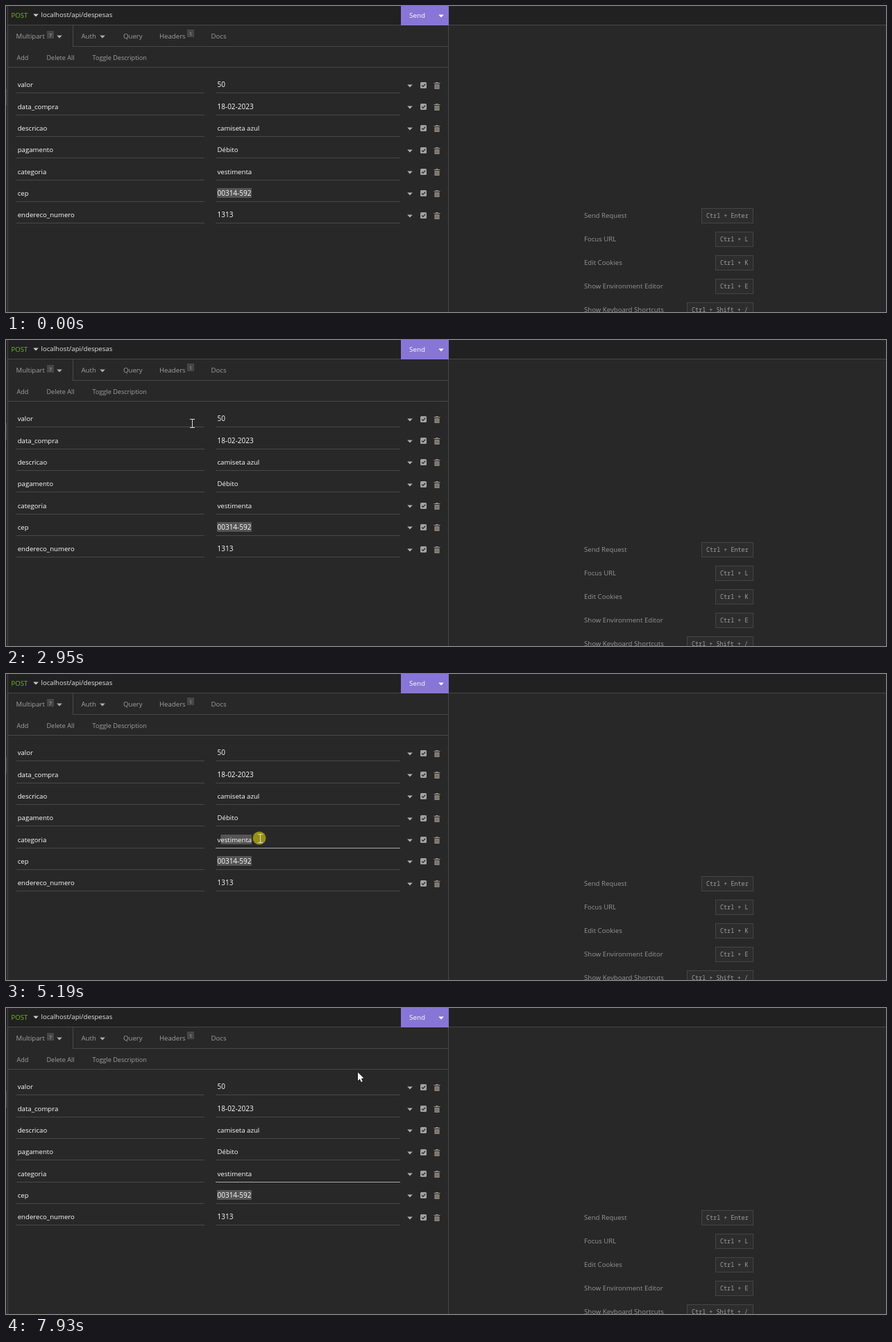
Write an HTML page with a canvas that moves like this. It is 1268 px wide and 442 px high and loops after 8000 ms.

```html
<!DOCTYPE html>
<html lang="pt">
<head>
<meta charset="utf-8">
<title>Request form</title>
<style>
html, body { margin: 0; width: 100%; height: 100%; overflow: hidden; background: #282828; }
canvas { display: block; }
</style>
</head>
<body>
<canvas id="stage" width="1268" height="442"></canvas>
<script>
const ctx = document.getElementById('stage').getContext('2d');
const LOOP = 8000, PRESS = 4820, RELEASE = 7060;
const SANS = '"Open Sans", "Noto Sans", sans-serif';
const MONO = '"Noto Sans Mono", "Liberation Mono", monospace';
const LINE = '#484848', MUTED = '#a0a0a0', ICON = '#a2a2a2', SELECTION = '#555';
const DRAG_ROW = 4, CODE_ROW = 5, VALUE_X = 304.5;

const rows = [
  ['valor', '50'],
  ['data_compra', '18-02-2023'],
  ['descricao', 'camiseta azul'],
  ['pagamento', 'Débito'],
  ['categoria', 'vestimenta'],
  ['cep', '00314-592'],
  ['endereco_numero', '1313']
];

const shortcuts = [
  ['Send Request', 'Ctrl + Enter'],
  ['Focus URL', 'Ctrl + L'],
  ['Edit Cookies', 'Ctrl + K'],
  ['Show Environment Editor', 'Ctrl + E'],
  ['Show Keyboard Shortcuts', 'Ctrl + Shift + /']
];

// The pointer rests between moves; "via" bends a move into a quadratic curve.
const origin = [380, 446];
const moves = [
  { from: 500, until: 970, to: [486, 446], via: [440, 364] },
  { from: 1330, until: 1370, to: [542, 440] },
  { from: 1370, until: 2160, to: [301, 182], via: [148, 146] },
  { from: 2200, until: 2410, to: [311, 190] },
  { from: 2590, until: 2950, to: [268, 120], via: [443, 74] },
  { from: 2950, until: 3320, to: [250, 146], via: [215, 130] },
  { from: 3420, until: 3990, to: [310, 215] },
  { from: 4280, until: 4530, to: [312, 234] },
  { from: 4820, until: 5190, to: [366, 237] },
  { from: 5650, until: 5860, to: [291, 240] },
  { from: 5860, until: 6440, to: [343, 241], via: [261, 241] },
  { from: 6520, until: 6770, to: [402, 242] },
  { from: 7600, until: 7930, to: [507, 93], via: [275, 190] }
];

const mix = (a, b, k) => a + (b - a) * k;

function pointerAt(t) {
  let position = origin;
  for (const { from, until, to, via } of moves) {
    if (t < from) break;
    const k = Math.min(1, (t - from) / (until - from));
    const start = position;
    position = to.map((end, axis) => via
      ? mix(mix(start[axis], via[axis], k), mix(via[axis], end, k), k)
      : mix(start[axis], end, k));
  }
  const [x, y] = position.map(Math.round);
  return { x, y };
}

function rect(x, y, w, h, color) {
  ctx.fillStyle = color;
  ctx.fillRect(x, y, w, h);
}

function textWidth(str, size = 9.65) {
  ctx.font = `${size}px ${SANS}`;
  return ctx.measureText(str).width;
}

function text(str, x, middle, color, size = 9.65, family = SANS) {
  ctx.font = `${size}px ${family}`;
  ctx.fillStyle = color;
  ctx.fillText(str, x, Math.round(middle + 3.5));
}

function polygon(points, color, outline) {
  ctx.beginPath();
  points.forEach(([x, y]) => ctx.lineTo(x, y));
  ctx.closePath();
  if (outline) {
    ctx.strokeStyle = outline;
    ctx.lineWidth = 1.5;
    ctx.stroke();
  }
  ctx.fillStyle = color;
  ctx.fill();
}

function caret(x, y, color = '#b0b0b0') {
  polygon([[x - 3.8, y - 2], [x + 3.8, y - 2], [x, y + 2]], color);
}

function badge(label, x, y) {
  rect(x, y, 10, 11, '#464646');
  text(label, x + 3, y + 5, '#b0b0b0', 7);
}

function checkbox(x, y) {
  ctx.beginPath();
  ctx.roundRect(x, y, 9, 9, 1.5);
  ctx.fillStyle = ICON;
  ctx.fill();
  ctx.beginPath();
  ctx.moveTo(x + 2, y + 4.6);
  ctx.lineTo(x + 3.8, y + 6.4);
  ctx.lineTo(x + 7.2, y + 2.8);
  ctx.strokeStyle = '#282828';
  ctx.lineWidth = 1.3;
  ctx.stroke();
}

function trash(x, y) {
  rect(x, y + 1, 9, 1, '#a0978e');
  rect(x + 3, y, 3, 1, '#a0978e');
  rect(x + 1, y + 3, 7, 7, '#958b82');
  for (let i = 0; i < 3; i++) rect(x + 2.5 + 1.7 * i, y + 4, 0.6, 5, '#55504b');
}

function drawChrome() {
  rect(0, 0, 1268, 442, '#282828');
  rect(0, 0, 1268, 27, '#212121');
  rect(2, 27, 1266, 1, LINE);
  rect(2, 0, 1, 442, LINE);
  rect(637, 0, 1, 442, LINE);
  rect(96, 28, 1, 31, LINE);
  rect(96, 58, 541, 1, LINE);
  rect(2, 88, 635, 1, LINE);
  rect(0, 120, 1, 24, LINE);

  text('POST', 7.5, 13.4, '#75ba24');
  caret(43, 13.5, '#ccc');
  text('localhost/api/despesas', 50.5, 12.9, '#e6e6e6');
  rect(569, 0, 69, 28, '#8776d5');
  text('Send', 581, 13.4, '#fff', 9.85);
  caret(627, 14.5, '#fff');

  [['Multipart', 14.5], ['Auth', 108.5], ['Query', 169], ['Headers', 221], ['Docs', 295.5]]
    .forEach(([label, x]) => text(label, x, 43.4, MUTED));
  badge('7', 59, 36);
  badge('1', 261, 34);
  caret(77, 44.5);
  caret(139, 44.5);

  let x = 15.5;
  for (const label of ['Add', 'Delete All', 'Toggle Description']) {
    text(label, x, 74, MUTED, 9.1);
    x += textWidth(label, 9.1) + 26;
  }
}

function drawShortcuts() {
  shortcuts.forEach(([label, keys], i) => {
    const y = 302.4 + 34 * i;
    const top = Math.round(y - 10.4);
    const width = Math.round(keys.length * 5.1 + 14);
    text(label, 833, y, '#959595');
    rect(1077 - width, top, width, 22, '#454545');
    rect(1078 - width, top + 1, width - 2, 20, '#2d2d2d');
    text(keys, 1084 - width, y, '#a0a0a0', 8.45, MONO);
  });
}

// Selects from after the first letter to the letter gap nearest the pointer.
function drawDragSelection(str, pointerX) {
  const gaps = Array.from({ length: str.length + 1 }, (_, i) => VALUE_X + textWidth(str.slice(0, i)));
  const distance = x => Math.abs(x - pointerX);
  const end = gaps.reduce((a, b) => distance(b) < distance(a) ? b : a);
  rect(Math.min(gaps[1], end), 232, Math.abs(end - gaps[1]), 14, SELECTION);
}

function drawRows(t, pointer) {
  rows.forEach(([name, value], i) => {
    const y = 113.8 + 31.35 * i;
    const lineY = Math.round(y + 11.5);
    const iconY = Math.round(y + 0.9);
    const size = /^\d/.test(value) ? 10 : 9.65;
    const focused = i === DRAG_ROW && t >= PRESS;
    rect(15, lineY, 271, 1, LINE);
    rect(302, lineY, 266, 1, focused ? '#a8a8a8' : LINE);
    if (i === CODE_ROW) rect(304, 263, textWidth(value, size) + 1, 14, SELECTION);
    if (focused && t < RELEASE) drawDragSelection(value, pointer.x);
    text(name, 16.7, y, '#fff');
    text(value, VALUE_X, y, '#fff', size);
    caret(582, iconY + 0.5);
    checkbox(597, iconY - 5);
    trash(616.5, iconY - 5);
  });
}

function drawArrow(x, y) {
  const outline = [[0, 0], [0, 12], [2.8, 9.5], [4.8, 14], [6.8, 13], [4.9, 8.8], [8.6, 8.6]];
  polygon(outline.map(([dx, dy]) => [x + dx, y + dy]), '#fff', '#111');
}

function drawTextCursor(x, y) {
  rect(x, y - 6, 1, 13, '#dcdcdc');
  for (const dy of [-6, 6]) {
    rect(x - 3, y + dy, 3, 1, '#dcdcdc');
    rect(x + 1, y + dy, 3, 1, '#dcdcdc');
  }
}

function drawPointer(t, { x, y }) {
  const overField = y > 100 && y < 316 && (x > 14 && x < 286 || x > 300 && x < 568);
  if (!overField) return drawArrow(x, y);
  if (t >= PRESS && t < RELEASE) {
    ctx.beginPath();
    ctx.arc(x - 1, y, 9.5, 0, Math.PI * 2);
    ctx.fillStyle = 'rgba(240, 230, 0, .55)';
    ctx.fill();
  }
  drawTextCursor(x, y);
}

function draw() {
  const t = performance.now() % LOOP;
  const pointer = pointerAt(t);
  drawChrome();
  drawRows(t, pointer);
  drawShortcuts();
  drawPointer(t, pointer);
  requestAnimationFrame(draw);
}
draw();
</script>
</body>
</html>
```
